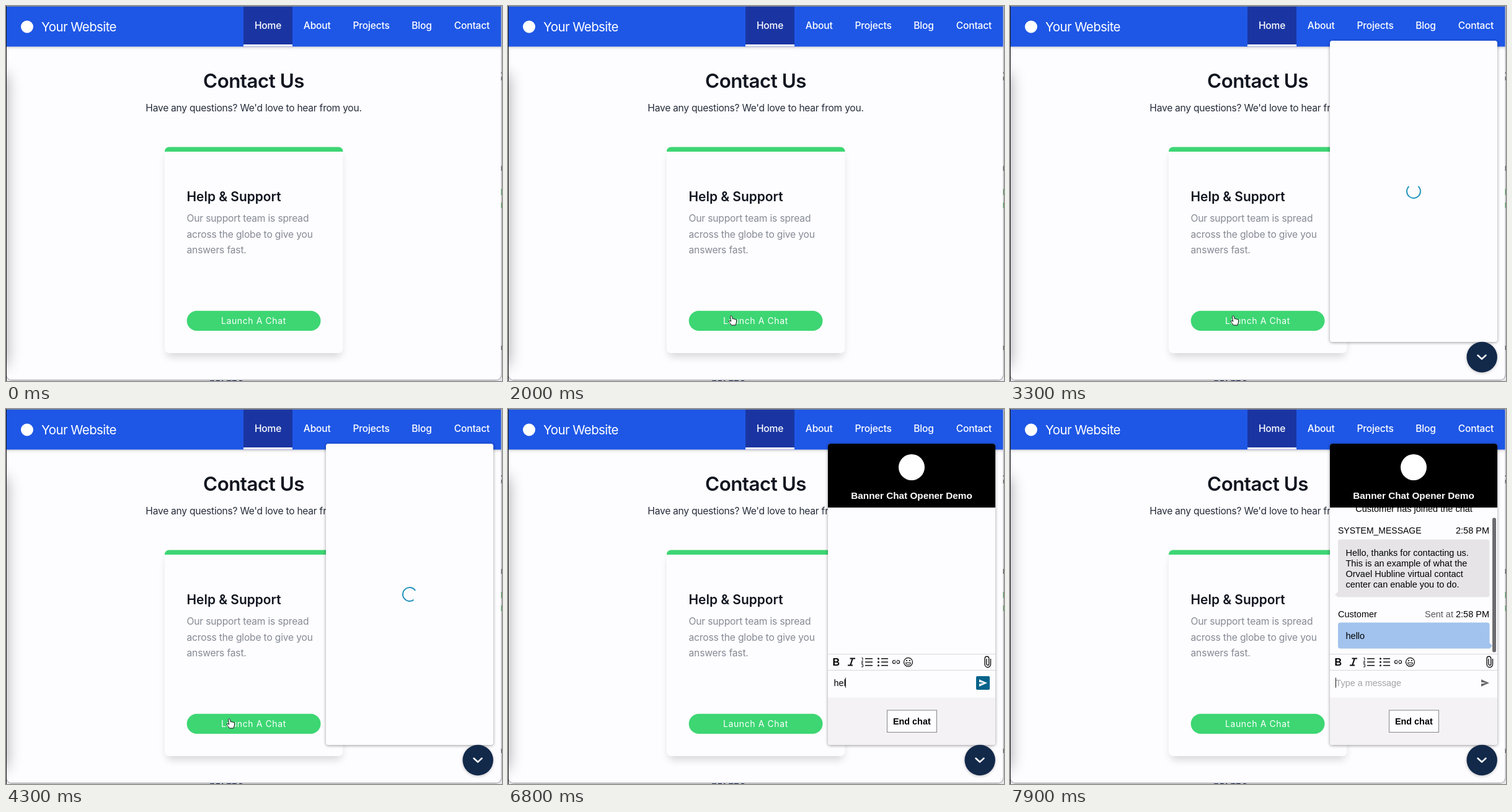
Animation of 800 by 605 pixels, one loop 8000 ms. Source, as an HTML page:

```html
<!DOCTYPE html>
<html lang="en">
<head>
<meta charset="utf-8">
<title>Contact page with chat widget</title>
<style>
  html, body { margin: 0; width: 100%; height: 100%; overflow: hidden; background: #e6e5e9; }
  svg { display: block; width: 800px; height: 605px; }
  text { white-space: pre; }
  .page { font: 15.6px Inter, sans-serif; letter-spacing: -.25px; }
  .brand { font-size: 20.5px; letter-spacing: -.6px; }
  .nav { font-weight: 450; letter-spacing: -.2px; }
  .title { font-size: 31.3px; font-weight: 600; letter-spacing: -.5px; }
  .heading { font-size: 20.9px; font-weight: 600; letter-spacing: 0; }
  .body { letter-spacing: -.17px; }
  .button { font-size: 14px; letter-spacing: .6px; }
  .chat { font: 14.5px "Liberation Sans", Arial, sans-serif; }
  .bold { font-weight: bold; }
  .white { fill: #fff; }
  .middle { text-anchor: middle; }
  .end { text-anchor: end; }
  .line { fill: none; stroke: #111; stroke-width: 1.5; }
</style>
</head>
<body>
<svg viewBox="0 0 800 605" xmlns="http://www.w3.org/2000/svg">
  <defs>
    <filter id="soft" x="-20%" y="-20%" width="140%" height="140%"><feGaussianBlur stdDeviation="6.5"/></filter>
    <filter id="close" x="-10%" y="-10%" width="120%" height="120%"><feGaussianBlur stdDeviation="2.5"/></filter>
    <filter id="wide" x="-100%" y="-20%" width="300%" height="140%"><feGaussianBlur stdDeviation="12"/></filter>
    <clipPath id="window"><path d="M1 1H798.5V595a8 8 0 0 1 -8 8H9a8 8 0 0 1 -8 -8Z"/></clipPath>
    <clipPath id="card"><rect x="256" y="227.5" width="287.5" height="332.5" rx="7"/></clipPath>
    <clipPath id="panel"><rect x="516" y="56" width="270" height="486" rx="4"/></clipPath>
    <clipPath id="log"><rect x="516" y="159" width="270" height="236"/></clipPath>
  </defs>

  <!-- What lies behind the browser window -->
  <rect width="800" height="605" fill="#e6e5e9"/>
  <text x="328" y="605.5" font-family="DejaVu Sans Mono, monospace" font-size="15" font-weight="bold" fill="#26365f">script</text>
  <g fill="#333"><path d="M798 107h2v2h-2zM798 114h2v6h-2zM798 258h2v8h-2zM798 548h2v7h-2z"/>
    <path d="M798 295h2v10h-2zM798 317h2v9h-2z" fill="#2a9a2f"/></g>
  <path d="M0 .5H799V595a8.500 8.500 0 0 1 -8.500 8.500H9a8.500 8.500 0 0 1 -8.500 -8.500" fill="none" stroke="#8b8b91"/>

  <g class="page" clip-path="url(#window)">
    <rect width="800" height="605" fill="#fdfcfe"/>
    <rect x="-40" y="110" width="41" height="470" opacity=".34" filter="url(#wide)"/>

    <rect x="-10" y="2" width="820" height="64.5" opacity=".22" filter="url(#close)"/>
    <rect width="800" height="65.5" fill="#1e57e6"/>
    <rect x="383" width="79" height="65.5" fill="#1a35a2"/>
    <rect x="383" y="62" width="79" height="3.5" class="white"/>
    <g class="white">
      <circle cx="34" cy="33.5" r="10"/>
      <text x="57" y="41" class="brand">Your Website</text>
      <g class="nav middle">
        <text x="422.5" y="37.3">Home</text>
        <text x="501.7" y="37.3">About</text>
        <text x="589" y="37.3">Projects</text>
        <text x="670.5" y="37.3">Blog</text>
        <text x="751.5" y="37.3">Contact</text>
      </g>
    </g>

    <g class="middle">
      <text x="399.5" y="131.7" class="title" fill="#10151f">Contact Us</text>
      <text x="399.5" y="170" fill="#252d3a">Have any questions? We'd love to hear from you.</text>
    </g>

    <rect x="259" y="239" width="282" height="327" rx="7" opacity=".15" filter="url(#soft)"/>
    <g clip-path="url(#card)">
      <rect x="256" y="227" width="288" height="334" fill="#fdfcfe"/>
      <rect x="256" y="227" width="288" height="8" fill="#3dd673"/>
    </g>
    <text x="291.5" y="314.5" class="heading" fill="#10151f">Help &amp; Support</text>
    <g class="body" fill="#858a95">
      <text x="291.5" y="348.3">Our support team is spread</text>
      <text x="291.5" y="373.5">across the globe to give you</text>
      <text x="291.5" y="398.7">answers fast.</text>
    </g>
    <rect x="291.7" y="491.7" width="215.8" height="32.3" rx="16.1" fill="#3dd673"/>
    <text x="347" y="512.7" class="button white">Launch A Chat</text>
  </g>
  <path d="M.5 0V605" stroke="#15151a"/>

  <g id="widget" class="chat">
    <rect x="516" y="57" width="270" height="486" rx="4" opacity=".4" filter="url(#close)"/>
    <g clip-path="url(#panel)">
      <rect x="516" y="56" width="270" height="486" fill="#fdfcfe"/>
      <circle id="spinner" cx="651" cy="299" r="11" fill="none" stroke="#2796bf" stroke-width="2" pathLength="360" stroke-dasharray="275 85"/>

      <g id="session">
        <g id="messages" clip-path="url(#log)">
          <text x="651.5" y="166" class="middle">Customer has joined the chat</text>
          <text x="529" y="201" font-size="14">SYSTEM_MESSAGE</text>
          <text x="773" y="201" class="end">2:58 PM</text>
          <path d="M533 210.500H769.500a4 4 0 0 1 4 4V299.500a4 4 0 0 1 -4 4H529L524 299.500L529 295V214.500a4 4 0 0 1 4 -4Z" fill="#e6e4e7"/>
          <text x="541.5" y="236.5">Hello, thanks for contacting us.</text>
          <text x="541.5" y="253.5">This is an example of what the</text>
          <text x="541.5" y="270.8">Orvael Hubline virtual contact</text>
          <text x="541.5" y="288">center can enable you to do.</text>
          <text x="529" y="335.5">Customer</text>
          <text x="773" y="335.5" class="end"><tspan fill="#56565a">Sent at </tspan>2:58 PM</text>
          <path d="M533 344.500H769.500a4 4 0 0 1 4 4V377.500L778 382L773.500 386.500H533a4 4 0 0 1 -4 -4V348.500a4 4 0 0 1 4 -4Z" fill="#a2c3ed"/>
          <text x="541.5" y="370.5">hello</text>
          <rect x="778" y="175.5" width="6" height="217" rx="3" fill="#6c6c70"/>
        </g>

        <rect x="516" y="56" width="270" height="103"/>
        <circle cx="651" cy="94" r="21" class="white"/>
        <text x="651" y="145" class="middle bold white" font-size="15.3">Banner Chat Opener Demo</text>

        <path d="M516 395.500H786M516 421.500H786" stroke="#d8d7db"/>
        <text x="523.5" y="413.5" class="bold" font-size="16">B</text>
        <path d="M551.500 402.500H560M548 413.500H556M555.800 402.500L552.200 413.500" class="line" style="stroke-width:2.2"/>
        <path d="M576 402.800H588M576 408.300H588M576 413.800H588M602 402.800H613M602 408.300H613M602 413.800H613" class="line"/>
        <path d="M570.500 401.500h1.500v4M570 407h2.500l-2.500 3h2.800M570 412h2.500v4h-2.500" class="line" style="stroke-width:1"/>
        <path d="M597.500 402.800h.01M597.500 408.300h.01M597.500 413.800h.01" class="line" style="stroke-width:3;stroke-linecap:round"/>
        <path d="M625 405.500h-2a2.600 2.600 0 0 0 0 5.200h2M627 405.500h2a2.600 2.600 0 0 1 0 5.200h-2M623.500 408.100h5" class="line" style="stroke-width:1.2"/>
        <circle cx="645.5" cy="408.3" r="7" class="line" style="stroke-width:1.3"/>
        <circle cx="643" cy="406" r="1.1"/><circle cx="648" cy="406" r="1.1"/>
        <path d="M641.700 409.500h7.600a3.800 3.400 0 0 1 -7.600 0Z" class="line" style="stroke-width:1.1"/>
        <path d="M778.500 403V412a4.700 4.700 0 0 1 -9.400 0V402.500a3.300 3.300 0 0 1 6.600 0V411.500a1.900 1.900 0 0 1 -3.800 0V403" class="line" style="stroke-width:1.4"/>

        <text id="hint" x="525.5" y="447" font-size="14.4" fill="#a4a3a9">Type a message</text>
        <text id="draft" x="525.5" y="447" font-size="14.4"></text>
        <path id="caret" d="M.5 433.500V449.500" stroke="#111"/>
        <rect id="sendBox" x="755" y="431" width="22" height="22" rx="2" fill="#07638b"/>
        <path id="sendIcon" d="M760 436.300L773 442L760 447.700V443.300L768 442L760 440.700Z"/>

        <rect x="516" y="465.5" width="270" height="77" fill="#f4f2f5"/>
        <rect x="611.5" y="486" width="80" height="35.5" fill="#fefdff" stroke="#85858a"/>
        <text x="651.3" y="509" class="middle bold" font-size="14.4">End chat</text>
      </g>
    </g>
    <circle cx="761" cy="567.5" r="24.5" opacity=".25" filter="url(#close)"/>
    <circle cx="761.2" cy="566.5" r="24.7" fill="#12294a"/>
    <path d="M754.500 563.500L761 569.500L767.500 563.500" fill="none" stroke="#fff" stroke-width="2.5" stroke-linecap="round" stroke-linejoin="round"/>
  </g>

  <g id="cursor">
    <path id="arrow" d="M0 0V12.500L3 9.800L5 14.300L7.300 13.300L5.300 9H9.200Z" stroke="#fff" stroke-width=".9"/>
    <path id="hand" d="M-1.500 .8Q0 -1.500 1.400 .8L2.400 5Q4 3.800 4.800 5.200Q6.400 4.300 7 5.900Q8.700 5.500 8.800 7.500L8.200 11L7 15H.5L-3.500 9.500Q-4.500 7.500 -2.500 7.600L-.3 9Z" class="white" stroke="#111"/>
    <path id="beam" d="M-2.500 -8Q0 -8 0 -6V6Q0 8 -2.500 8M2.500 -8Q0 -8 0 -6V6Q0 8 2.500 8" fill="none" stroke="#111"/>
  </g>
</svg>

<script>
  const LOOP = 8000;
  const OPENED = 2500, LOADED = 4600, FOCUSED = 5700, SENT = 7350, ANSWERED = 7500;
  const KEY_TIMES = [6350, 6550, 6750, 6920, 7080];
  const POINTER = [
    [700, 470, 606], [1450, 360, 500], [4850, 360, 500],
    [5100, 419, 486], [5550, 560, 442], [6300, 560, 442]
  ];
  const el = id => document.getElementById(id);
  const show = (id, visible) => el(id).style.display = visible ? "" : "none";
  const ease = p => p * p * (3 - 2 * p);

  function pointerAt(t) {
    const next = POINTER.findIndex(point => point[0] > t);
    if (next < 1) return null;
    const [t0, x0, y0] = POINTER[next - 1], [t1, x1, y1] = POINTER[next];
    const p = ease((t - t0) / (t1 - t0));
    return [x0 + (x1 - x0) * p, y0 + (y1 - y0) * p];
  }

  function drawPointer(t) {
    const spot = pointerAt(t);
    show("cursor", spot);
    if (!spot) return;
    const [x, y] = spot;
    const overButton = x > 292 && x < 507 && y > 492 && y < 524;
    const overInput = t > LOADED && x > 517 && y > 422 && y < 465;
    show("hand", overButton);
    show("beam", overInput);
    show("arrow", !overButton && !overInput);
    el("cursor").setAttribute("transform", `translate(${x} ${y})`);
  }

  function drawInput(t) {
    const typed = t < SENT ? KEY_TIMES.filter(time => time <= t).length : 0;
    const draft = el("draft");
    draft.textContent = "hello".slice(0, typed);
    show("hint", !typed);
    show("sendBox", typed);
    el("sendIcon").setAttribute("fill", typed ? "#fff" : "#66666b");
    const blinkStart = t < KEY_TIMES[0] ? FOCUSED : SENT;
    show("caret", t >= FOCUSED && (typed || (t - blinkStart) % 1000 < 600));
    const x = 525 + (typed ? draft.getComputedTextLength() : 0);
    el("caret").setAttribute("transform", `translate(${Math.round(x)})`);
  }

  function render(now) {
    const t = now % LOOP;
    show("widget", t >= OPENED);
    show("spinner", t < LOADED);
    show("session", t >= LOADED);
    show("messages", t >= ANSWERED);
    el("spinner").setAttribute("transform", `rotate(${-48 + (t - 3300) * .46} 651 299)`);
    if (t >= LOADED) drawInput(t);
    drawPointer(t);
    requestAnimationFrame(render);
  }
  requestAnimationFrame(render);
</script>
</body>
</html>
```
